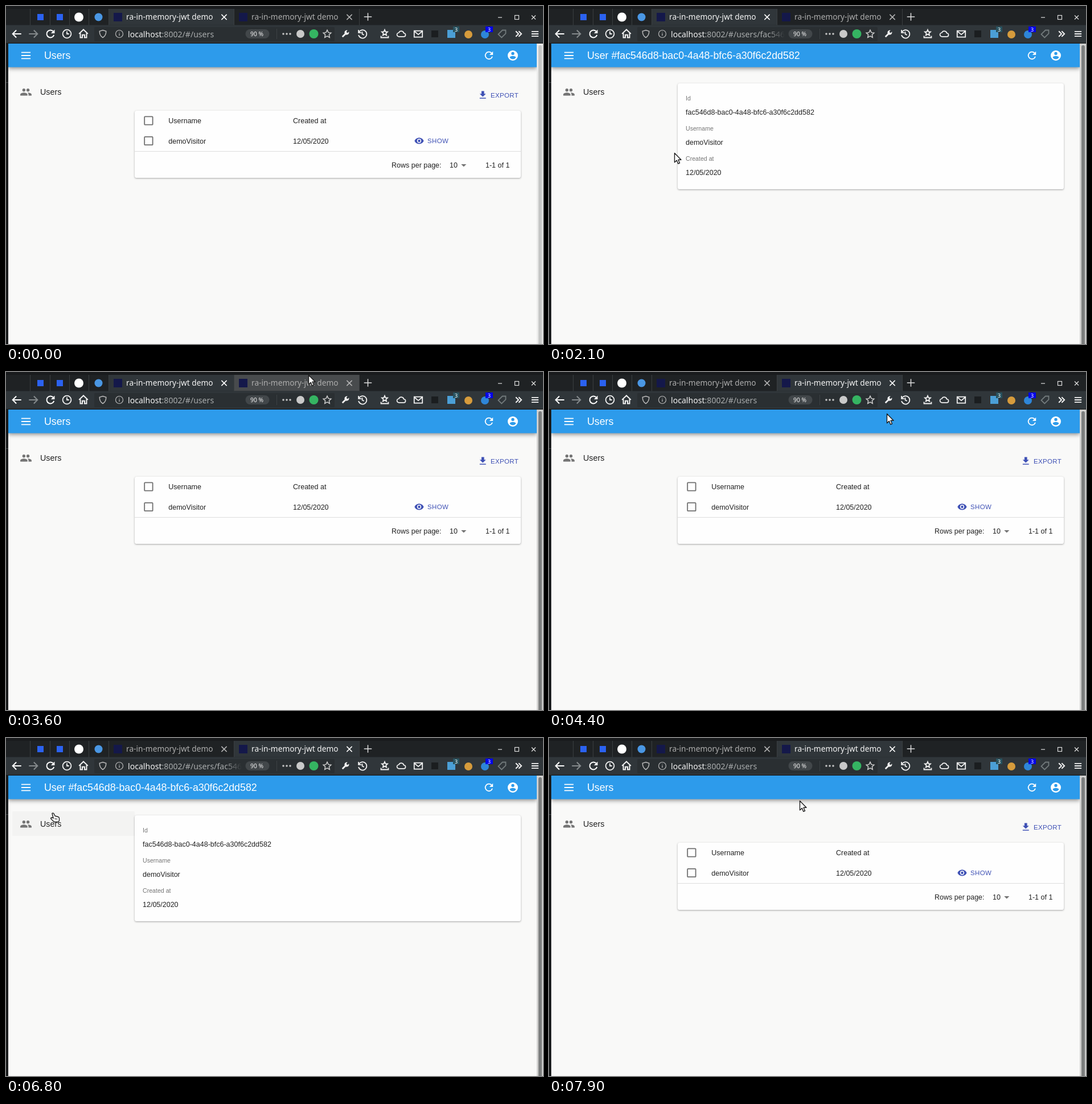
These frames come from a looping animation (943x594 px, 8 s). An HTML page with a canvas:

```html
<!DOCTYPE html>
<html lang="en">
<head>
<meta charset="utf-8">
<title>Users demo</title>
<style>
html, body { margin: 0; width: 100%; height: 100%; overflow: hidden; background: #f9f9f8; }
canvas { display: block; }
</style>
</head>
<body>
<canvas id="stage" width="943" height="594"></canvas>
<script>
const ctx = document.getElementById('stage').getContext('2d');
const LOOP = 8000, STEP = 100;
const SANS = '"Liberation Sans", Arial, sans-serif';
const UI = '"Noto Sans", sans-serif';
const USER = 'demoVisitor';
const ID = 'fac546d8-bac0-4a48-bfc6-a30f6c2dd582';
const INDIGO = '#3f51b5', INK = '#212121', GREY = '#757575', BAR = '#30363a', LIGHT = '#f2f2f2';

// Icons on a 24 unit grid
const ICONS = {
  account: 'M2 12a10 10 0 1 0 20 0a10 10 0 1 0-20 0M9 8a3 3 0 1 0 6 0a3 3 0 1 0-6 0M6 16c0-2 4-3.1 6-3.1s6 1.1 6 3.1a7.2 7.2 0 0 1-12 0z',
  people: 'M13 8a3 3 0 1 0 6 0a3 3 0 1 0-6 0M5 8a3 3 0 1 0 6 0a3 3 0 1 0-6 0M1 19v-2.5C1 14.2 5.7 13 8 13s7 1.2 7 3.5V19zM17 19h6v-2.5c0-2.3-4.7-3.5-7-3.5l-1 .1c1.2.8 2 1.9 2 3.4z',
  download: 'M19 9h-4V3H9v6H5l7 7 7-7zM5 18v2h14v-2H5z',
  eye: 'M12 4.5C7 4.5 2.7 7.6 1 12c1.7 4.4 6 7.5 11 7.5s9.3-3.1 11-7.5c-1.7-4.4-6-7.5-11-7.5zM7 12a5 5 0 1 0 10 0a5 5 0 1 0-10 0M9 12a3 3 0 1 0 6 0a3 3 0 1 0-6 0',
  reloadArc: 'M18.7 14A7 7 0 1 1 17 7',
  reloadTip: 'M20 4v7h-7z',
  arrow: 'M21 12H4M11 4.5L3.5 12l7.5 7.5',
  clock: 'M3 12a9 9 0 1 0 18 0a9 9 0 1 0-18 0M12 6.5V12h4.5',
  home: 'M2 12.5L12 3l10 9.5M5 11v10h4.5v-6h5v6H19V11',
  shield: 'M12 3l8 2.5c0 7-1.5 12-8 15.5c-6.500-3.500-8-8.500-8-15.500z',
  info: 'M3 12a9 9 0 1 0 18 0a9 9 0 1 0-18 0M12 10.500v6M12 7v1.500',
  star: 'M12 2.500l2.900 6.200 6.600.8-4.900 4.600 1.300 6.700-5.900-3.300-5.900 3.300 1.300-6.700-4.900-4.600 6.600-.8z',
  wrench: 'M3.500 20.500L14 10',
  wrenchHead: 'M22 6l-4 3.500-3.500-3.500L18 2a6.500 6.500 0 1 0 4 4z',
  history: 'M4 4v6h6M4.500 9.500A9 9 0 1 1 4 15M12 7.500V13l4 2',
  shelf: 'M12 2l2 4.500 5 .5-3.700 3.400 1 5-4.300-2.500-4.300 2.500 1-5L5 7l5-.5zM3 17v4h18v-4',
  cloud: 'M7 19a4.500 4.500 0 0 1-.5-9a6 6 0 0 1 11.500 1a4 4 0 0 1 0 8z',
  mail: 'M2.500 5h19v14.500h-19zM3 6l9 7.500L21 6',
  tag: 'M3 13L13 3h8v8L11 21z',
  chevrons: 'M4 4l8 8-8 8M12.500 4l8 8-8 8',
  cross: 'M5 5l14 14M19 5L5 19',
  plus: 'M12 3v18M3 12h18',
  lines: 'M3 6h18M3 12h18M3 18h18'
};
const paths = Object.fromEntries(Object.entries(ICONS).map(([k, d]) => [k, new Path2D(d)]));
const arrowCursor = new Path2D('M0 0V16.300L3.800 12.800 6.300 18.700 9 17.500 6.500 11.800H11.500Z');
const handCursor = new Path2D('M2.500 1Q4-.5 5.500 1.500L7.500 5.500 13 7Q15 7.500 15 10V13.500L13.500 16H6L.5 10.500Q-.5 8.500 2 8.500L4.500 9Z');

// Pointer keys: time, x, y
const POINTER = [
  [500, 482, 37], [600, 576, 76], [700, 576, 76], [800, 588, 130], [900, 640, 215], [1000, 700, 280],
  [1100, 735, 292], [1200, 752, 243], [2000, 752, 243], [2100, 220, 258], [2200, 212, 255],
  [2300, 212, 255], [2600, 72, 146], [3000, 72, 146], [3300, 320, 100], [3500, 515, 18],
  [3600, 531, 5], [4100, 545, 14], [4200, 545, 14], [4400, 593, 73], [4600, 640, 150],
  [4700, 640, 150], [5300, 751, 242], [5800, 751, 242], [5900, 735, 242], [6000, 735, 242],
  [6100, 324, 242], [6200, 324, 242], [6800, 82, 131], [7100, 72, 146], [7300, 72, 146],
  [7700, 398, 112], [7800, 398, 112], [7900, 440, 110]
];
const SHOW = [709, 222, 76, 30], MENU = [11, 129, 215, 43], ROW = [226, 219, 678, 36], TAB2 = [401, 5, 219, 28];
const CLICKS = [[1400, SHOW], [2800, MENU], [5500, SHOW], [7200, MENU]];

const between = (t, a, b) => t >= a && t < b;
const inside = (p, [x, y, w, h]) => p && between(p.x, x, x + w) && between(p.y, y, y + h);

function pointerAt(t) {
  if (t < POINTER[0][0]) return null;
  const i = POINTER.findLastIndex(k => k[0] <= t);
  const [t0, x0, y0] = POINTER[i], [t1, x1, y1] = POINTER[i + 1] || [LOOP, x0, y0];
  const f = (t - t0) / (t1 - t0);
  return { x: x0 + (x1 - x0) * f, y: y0 + (y1 - y0) * f };
}

function rect(x, y, w, h, color) {
  ctx.fillStyle = color;
  ctx.fillRect(x, y, w, h);
}

function rounded(x, y, w, h, r, color) {
  ctx.beginPath();
  ctx.roundRect(x, y, w, h, r);
  ctx.fillStyle = color;
  ctx.fill();
}

function disc(x, y, r, color) {
  ctx.beginPath();
  ctx.arc(x, y, r, 0, Math.PI * 2);
  ctx.fillStyle = color;
  ctx.fill();
}

function text(str, x, y, size, color, font = SANS, spacing = 0) {
  ctx.font = `${size}px ${font}`;
  ctx.letterSpacing = spacing + 'px';
  ctx.fillStyle = color;
  ctx.fillText(str, x, y);
  return ctx.measureText(str).width;
}

function icon(name, cx, cy, scale, color, stroke = 0) {
  ctx.save();
  ctx.translate(cx - 12 * scale, cy - 12 * scale);
  ctx.scale(scale, scale);
  if (stroke) {
    ctx.lineWidth = stroke / scale;
    ctx.strokeStyle = color;
    ctx.stroke(paths[name]);
  } else {
    ctx.fillStyle = color;
    ctx.fill(paths[name], 'evenodd');
  }
  ctx.restore();
}

function reload(cx, cy, scale, width) {
  icon('reloadArc', cx, cy, scale, '#fff', width);
  icon('reloadTip', cx, cy, scale, '#fff');
}

function withShadow(blur, dy, alpha, draw) {
  ctx.save();
  ctx.shadowColor = `rgba(0,0,0,${alpha})`;
  ctx.shadowBlur = blur;
  ctx.shadowOffsetY = dy;
  draw();
  ctx.restore();
}

function drawTab(x, active, hover) {
  if (active || hover) rect(x, 5, 219, 28.5, active ? BAR : '#484b4d');
  rect(x + 8, 12, 15, 15, '#14184a');
  text('ra-in-memory-jwt demo', x + 30, 24.3, 13.7, active ? '#f5f5f5' : '#adadad', UI);
  icon('cross', x + 202, 19.5, 0.66, active ? '#fff' : '#b4b4b4', 1.5);
}

function drawTabs(second, hover) {
  rect(0, 0, 943, 34, '#1f2224');
  rect(0, 0, 943, 5, '#191b1d');
  drawTab(181, !second, false);
  drawTab(401, second, hover);
  for (const x of [42, 77, 111, 145, 180, 400, 620]) rect(x, 5, 1, 29, '#3a3e40');
  rect(55, 14, 11, 11, '#2b62f0');
  rect(89, 14, 11, 11, '#2b62f0');
  disc(128, 19.5, 8, '#fff');
  disc(162.5, 19.5, 7, '#4a97e4');
  icon('plus', 635.5, 19, 0.75, '#dedede', 1.5);
  rect(864, 19.500, 7, 1.2, '#ddd');
  ctx.strokeStyle = '#ddd';
  ctx.lineWidth = 1.2;
  ctx.strokeRect(893.5, 16.5, 7, 7);
  icon('cross', 926.5, 20, 0.5, '#ddd', 1.3);
}

function drawBadge(x, y, w, color) {
  rect(x, y, w, 10, color);
  text('3', x + w / 2 - 2.7, y + 8.7, 9.5, '#fff', UI);
}

function drawToolbar(detail) {
  rect(0, 33.500, 943, 32.500, BAR);
  rect(0, 65, 943, 1, '#17191a');
  rounded(155, 37, 422, 25, 2, '#2a2f32');

  icon('arrow', 19, 49, 0.86, '#fff', 2);
  ctx.save();
  ctx.translate(96, 0);
  ctx.scale(-1, 1);
  icon('arrow', 48, 49, 0.86, '#858a8c', 2);
  ctx.restore();
  reload(78, 49, 0.93, 2);
  icon('clock', 107, 49, 0.82, LIGHT, 1.8);
  icon('home', 136, 48.5, 0.78, LIGHT, 2);
  icon('shield', 170, 49, 0.72, '#bbb', 1.5);
  icon('info', 199, 49, 0.72, '#bbb', 1.2);

  const w = text('localhost', 214, 54.5, 14.1, '#f4f4f4', UI);
  text(':8002/#/users' + (detail ? '/fac546' : ''), 214 + w, 54.5, 14.1, '#a9acad', UI);
  const fade = ctx.createLinearGradient(385, 0, 414, 0);
  fade.addColorStop(0, 'rgba(42,47,50,0)');
  fade.addColorStop(1, '#2a2f32');
  rect(385, 38, 29, 23, fade);
  rect(414, 38, 58, 23, '#2a2f32');
  rounded(420.500, 41, 42, 16, 8, '#42474a');
  text('90 %', 429, 52.800, 10.300, '#f4f4f4', UI);
  rect(475, 40, 1, 18, '#3d4245');

  for (const x of [487, 493, 499]) disc(x, 49, 1.8, '#c4c4c4');
  disc(517, 49, 7, '#c9c9c9');
  disc(540.5, 49, 8, '#35b462');
  icon('star', 564, 49, 0.72, '#d0d0d0', 1.5);
  icon('wrench', 596, 49, 0.62, LIGHT, 2.8);
  icon('wrenchHead', 596, 49, 0.62, LIGHT);
  icon('history', 625.5, 48.5, 0.8, LIGHT, 1.8);
  icon('shelf', 665, 49, 0.72, LIGHT, 1.8);
  icon('cloud', 694, 48.5, 0.76, LIGHT, 1.7);
  icon('mail', 724, 49, 0.76, LIGHT, 1.8);
  rect(747, 43, 12, 12, '#1b1e20');
  rect(775, 42, 14, 14, '#4b9fd6');
  drawBadge(785, 36, 11, '#27525f');
  disc(812, 50, 7, '#d69b3c');
  disc(841, 50, 7, '#2e86d8');
  drawBadge(842, 36, 13, '#0000e8');
  icon('tag', 871, 49, 0.72, '#727a7c', 1.8);
  icon('chevrons', 900, 49, 0.6, LIGHT, 2);
  icon('lines', 929, 49, 0.68, LIGHT, 1.8);
}

function drawHeader(detail) {
  withShadow(7, 2, 0.42, () => rect(4, 66, 928, 41.500, '#2d9beb'));
  icon('lines', 35, 87, 0.9, '#fff', 1.8);
  text(detail ? 'User #' + ID : 'Users', 67, 93, 17.8, '#fff');
  reload(848, 87, 0.9, 1.8);
  icon('account', 890, 87, 0.9, '#fff');
}

function drawCard(y, h) {
  withShadow(3, 1, 0.34, () => rounded(226, y, 678, h, 3.6, '#fefefe'));
}

function checkbox(y) {
  ctx.beginPath();
  ctx.roundRect(243.2, y - 7.2, 14.4, 14.4, 1);
  ctx.strokeStyle = '#6f6f6f';
  ctx.lineWidth = 1.8;
  ctx.stroke();
}

function drawList(pointer) {
  icon('download', 837.3, 156.500, 0.78, INDIGO);
  text('EXPORT', 851, 160.500, 11.5, INDIGO, SANS, 0.33);
  drawCard(184, 118);
  if (inside(pointer, ROW)) rect(...ROW, 'rgba(0,0,0,.04)');
  if (inside(pointer, SHOW)) rounded(...SHOW, 3, 'rgba(63,81,181,.04)');
  checkbox(201.5);
  checkbox(237);
  text('Username', 285.3, 205.700, 12.5, INK);
  text('Created at', 504, 205.700, 12.5, INK);
  text(USER, 285.3, 241.700, 12.5, INK);
  text('12/05/2020', 504, 241.700, 12.5, INK);
  icon('eye', 725.5, 237, 0.73, INDIGO);
  text('SHOW', 740, 241, 11.5, INDIGO, SANS, 0.33);
  rect(226, 255, 678, 1, '#dedede');
  text('Rows per page:', 677, 284, 12.5, INK);
  text('10', 779, 284, 12.5, INK);
  text('1-1 of 1', 842, 284, 12.5, INK);
  ctx.beginPath();
  ctx.moveTo(799.2, 278);
  ctx.lineTo(808.400, 278);
  ctx.lineTo(803.8, 282.600);
  ctx.fillStyle = GREY;
  ctx.fill();
}

function drawDetail() {
  drawCard(136, 186);
  [['Id', ID], ['Username', USER], ['Created at', '12/05/2020']].forEach(([label, value], i) => {
    text(label, 240, 166 + i * 53, 10.6, GREY);
    text(value, 240, 191 + i * 53, 12.5, INK);
  });
}

function drawRipple(t, detail) {
  for (const [start, box] of CLICKS) {
    const age = t - start;
    if (!between(age, 0, 500) || (box === SHOW && detail)) continue;
    const p = pointerAt(start);
    ctx.save();
    ctx.beginPath();
    ctx.rect(...box);
    ctx.clip();
    disc(p.x, p.y, box[2] * Math.min(1, 0.25 + age / 350), `rgba(40,50,100,${0.14 * (1 - age / 500)})`);
    ctx.restore();
  }
}

function drawPage(t, detail, pointer) {
  rect(0, 66, 943, 528, '#f9f9f8');
  rect(0, 66, 4, 528, '#1a1c1d');
  rect(0, 134, 4, 1, '#44484a');
  drawHeader(detail);
  if (inside(pointer, MENU)) rect(...MENU, 'rgba(0,0,0,.025)');
  icon('people', 35, 151.3, 0.9, GREY);
  text('Users', 60, 155.700, 14.3, INK);
  if (detail) drawDetail();
  else drawList(pointer);
  drawRipple(t, detail);

  const focused = t >= 1400;
  rect(932, 66, 11, 528, focused ? '#d0d0cf' : '#ebebea');
  rounded(935, 69, 6, 540, 3, focused ? '#7c7e7e' : '#c5c6c5');
}

function drawPointer(p, hand) {
  ctx.save();
  ctx.translate(Math.round(p.x) - (hand ? 4 : 0) + 0.5, Math.round(p.y) + 0.5);
  ctx.lineJoin = 'round';
  ctx.lineWidth = 1.4;
  ctx.fillStyle = '#fff';
  ctx.strokeStyle = '#1c1c1c';
  const shape = hand ? handCursor : arrowCursor;
  ctx.fill(shape);
  ctx.stroke(shape);
  if (hand) {
    ctx.lineWidth = 1;
    ctx.stroke(new Path2D('M8 9l.5 3M10.500 9.500l.3 2.500M4.500 9L6 10'));
  }
  ctx.restore();
}

function render(now) {
  const t = Math.floor((now % LOOP) / STEP) * STEP;
  const detail = between(t, 1600, 2900) || between(t, 5600, 7300);
  const second = t >= 3800;
  const pointer = pointerAt(t);
  drawTabs(second, inside(pointer, TAB2));
  drawToolbar(detail);
  drawPage(t, detail, pointer);
  if (pointer) drawPointer(pointer, inside(pointer, MENU) || (!detail && inside(pointer, SHOW)));
}

const began = performance.now();
function tick() {
  render(performance.now() - began);
  requestAnimationFrame(tick);
}
tick();
</script>
</body>
</html>
```
